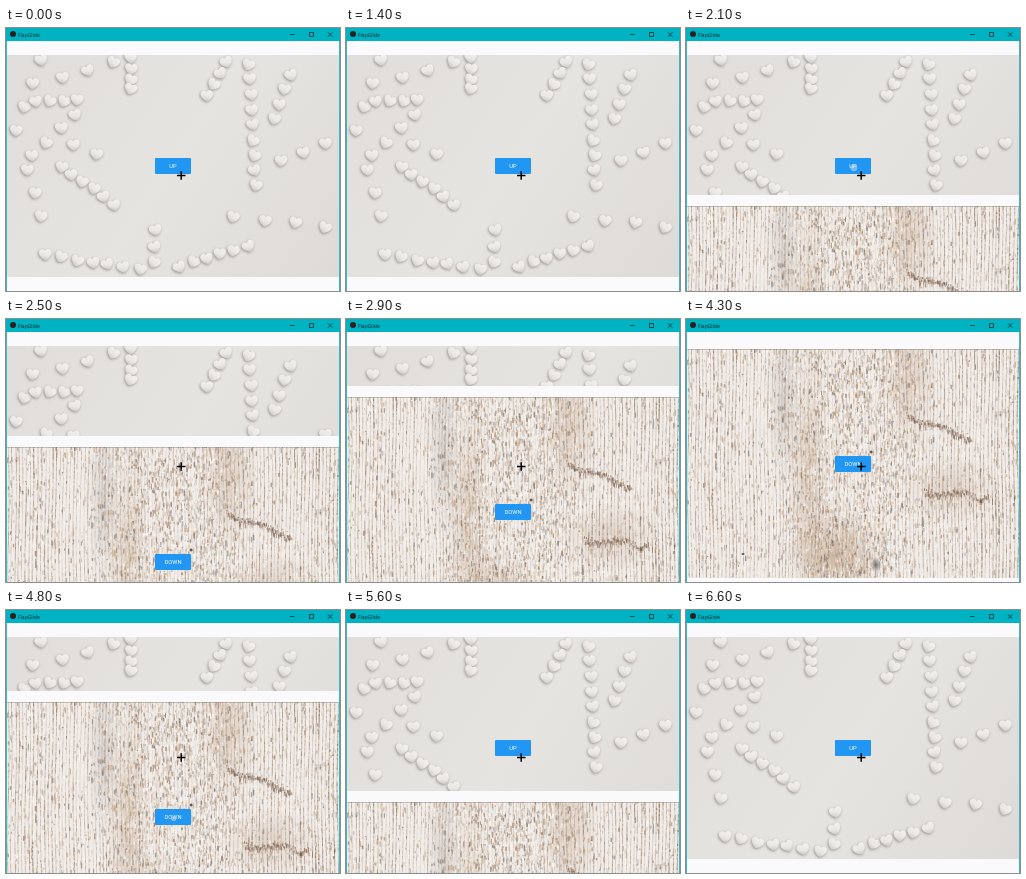
An HTML page with a canvas that plays this animation: 334 px wide and 263 px high, repeating every 7.1 s.

```html
<!DOCTYPE html>
<html lang="en">
<head>
<meta charset="utf-8">
<title>FlapGlide</title>
<style>
html, body { margin: 0; width: 100%; height: 100%; overflow: hidden; }
#stage { position: relative; width: 334px; height: 263px; overflow: hidden; background: #faf9fb; }
#stage * { position: absolute; }
#bar { left: 0; top: 0; width: 334px; height: 13px; background: #00b3c3; }
#bar i { left: 4px; top: 3px; width: 6px; height: 6px; border-radius: 50%; background: #2b2020; }
#bar span { left: 12px; top: 2.5px; font: 5px/8px "Open Sans", sans-serif; color: #0a2226; white-space: nowrap; }
svg { left: 0; top: 0; }
.page { left: 0; top: 13px; width: 334px; height: 250px; background: #faf9fb; }
.page canvas { left: 0; }
.btn { left: 149px; top: 117px; width: 36px; height: 16px; overflow: hidden; border-radius: 1px; background: #2196f3;
  color: #fff; font: 5.8px/16px Roboto, sans-serif; text-align: center; }
.btn b { left: 19px; top: 10px; border-radius: 50%; background: rgba(225, 230, 235, .45); transform: translate(-50%, -50%); }
#panel .btn { top: 118px; }
#edge { left: 0; top: 13px; width: 332px; height: 250px; border: solid #35b9c4; border-width: 0 1px; }
</style>
</head>
<body>
<div id="stage">
  <div class="page"><canvas id="hearts" width="334" height="222" style="top:14px"></canvas><div class="btn">UP<b></b></div></div>
  <div class="page" id="panel"><canvas id="wood" width="334" height="229" style="top:11px"></canvas><div class="btn">DOWN<b></b></div></div>
  <div id="edge"></div>
  <div id="bar"><i></i><span>FlapGlide</span></div>
  <svg width="334" height="263" fill="none" stroke="#06292d" stroke-width=".8">
    <path d="M284 6.5h4.5M303.5 4.5h4v4h-4zM322 4.3l4.4 4.4m0-4.4l-4.4 4.4"/>
    <path d="M171 147.5h8.5M175.2 143.3v8.5" stroke="#000" stroke-width="1.5"/>
  </svg>
</div>
<script>
const $ = id => document.getElementById(id);
let seed = 7;
const rnd = () => (seed = seed * 16807 % 2147483647) / 2147483647;
const between = (a, b) => a + (b - a) * rnd();

// Strings of hearts around the empty middle: start, end, count
const strings = [
  [36, 4, 10, 75, 4], [56, 23, 107, 7, 3], [124, 3, 125, 34, 4], [30, 47, 72, 45, 4],
  [69, 60, 26, 101, 4], [68, 90, 91, 99, 2], [22, 114, 35, 161, 3], [55, 112, 109, 149, 6],
  [39, 200, 134, 214, 7], [150, 174, 148, 208, 3], [173, 211, 242, 191, 6], [221, 6, 200, 40, 4],
  [243, 9, 250, 130, 9], [284, 20, 268, 64, 4], [276, 106, 320, 88, 3], [228, 161, 319, 172, 4]];

function drawHearts(c) {
  const bg = c.createLinearGradient(0, 0, 334, 222);
  bg.addColorStop(0, '#e0dddb');
  bg.addColorStop(.5, '#e6e4e1');
  bg.addColorStop(1, '#dddad7');
  c.fillStyle = bg;
  c.fillRect(0, 0, 334, 222);
  const heart = new Path2D('M0 6C-3 5-6.6 1-6.3-2C-6-5.5-1.5-6 0-3.5C1.5-6 6-5.5 6.3-2C6.6 1 3 5 0 6Z');
  const fill = c.createLinearGradient(2, -5, -2, 6);
  fill.addColorStop(0, '#f2f0ee');
  fill.addColorStop(.55, '#e9e6e4');
  fill.addColorStop(1, '#cdc8c5');
  c.fillStyle = fill;
  c.shadowColor = 'rgba(105,95,90,.6)';
  c.shadowBlur = 3;
  c.shadowOffsetX = -.7;
  c.shadowOffsetY = 1;
  for (const [x0, y0, x1, y1, n] of strings)
    for (let i = 0; i < n; i++) {
      const k = i / (n - 1);
      c.save();
      c.translate(x0 + (x1 - x0) * k + between(-1, 1), y0 + (y1 - y0) * k + between(-1, 1));
      c.rotate(between(-.5, .5));
      c.fill(heart);
      c.restore();
    }
}

function drawWood(c) {
  c.fillStyle = '#f1ece8';
  c.fillRect(0, 0, 334, 229);
  const blot = (x, y, rx, ry, rgb, alpha) => {
    c.save();
    c.translate(x, y);
    c.scale(rx, ry);
    const g = c.createRadialGradient(0, 0, 0, 0, 0, 1);
    g.addColorStop(0, `rgba(${rgb},${alpha})`);
    g.addColorStop(1, `rgba(${rgb},0)`);
    c.fillStyle = g;
    c.fillRect(-1, -1, 2, 2);
    c.restore();
  };
  const tan = '176,142,108', grey = '150,146,145';
  blot(122, 120, 22, 130, tan, .3);
  blot(150, 205, 50, 50, tan, .55);
  blot(222, 25, 30, 80, tan, .3);
  blot(265, 140, 50, 35, tan, .25);
  blot(98, 50, 18, 90, grey, .25);

  // Continuous grain, strong at the sides and worn away in the middle
  for (let x = 2; x < 334; x += between(2.8, 4.6)) {
    const phase = between(0, 6.3), width = between(.6, 1.3);
    const depth = .22 + .4 * Math.abs(x - 150) / 180;
    for (let y = 0; y < 229; y += 2) {
      const worn = .65 + .35 * Math.sin(y / 17 + phase) * Math.sin(y / 41 + x);
      c.fillStyle = `rgba(122,92,68,${depth * worn * between(.5, 1.5)})`;
      c.fillRect(x + Math.sin(y / 30 + x / 40) * .8, y, width, 2);
    }
  }
  // Chips of paint and bare wood
  const tones = ['255,253,251', '255,253,251', '145,108,74', '198,158,120', '110,104,101'];
  for (let i = 0; i < 7000; i++) {
    const x = i % 2 ? between(0, 334) : 165 + between(-85, 85) * between(.4, 1);
    c.fillStyle = `rgba(${tones[i % 5]},${between(.15, .65)})`;
    c.fillRect(x, between(-5, 229), between(.5, 1.6), between(1, 6));
  }
  // Ragged cracks running down to the right
  for (const [x, y, drop] of [[220, 66, 24], [238, 143, 4]])
    for (let k = 0; k < 1; k += .008) {
      c.fillStyle = `rgba(105,72,48,${between(.2, .65)})`;
      c.fillRect(x + 65 * k, y + drop * k + 3 * Math.sin(k * 9) + between(-4, 2), 1, between(1, 5));
    }
  blot(185, 103, 2, 2, '20,16,14', 1);
  blot(57, 205, 2, 1.5, '20,16,14', 1);
  blot(190, 216, 5, 8, '58,62,62', .7);
  c.fillStyle = 'rgba(90,75,65,.3)';
  c.fillRect(0, 0, 334, 1);
}

drawHearts($('hearts').getContext('2d'));
drawWood($('wood').getContext('2d'));

const panel = $('panel');
const [upRipple, downRipple] = document.querySelectorAll('.btn b');
const travel = (t, start) => Math.min(250, Math.max(0, (t - start) / 8));

function ripple(el, t, from, to) {
  const size = t >= from && t < to ? (t - from) / 110 : 0;
  el.style.width = el.style.height = size + 'px';
}

function frame(now) {
  const t = Math.floor(now % 7100 / 100) * 100;
  const y = Math.round(250 - travel(t, 1332) + travel(t, 4256));
  panel.style.transform = `translateY(${y}px)`;
  ripple(upRipple, t, 1300, 3600);
  ripple(downRipple, t, 4200, 6300);
}

const begin = performance.now();
function loop() {
  frame(performance.now() - begin);
  requestAnimationFrame(loop);
}
loop();
</script>
</body>
</html>
```
